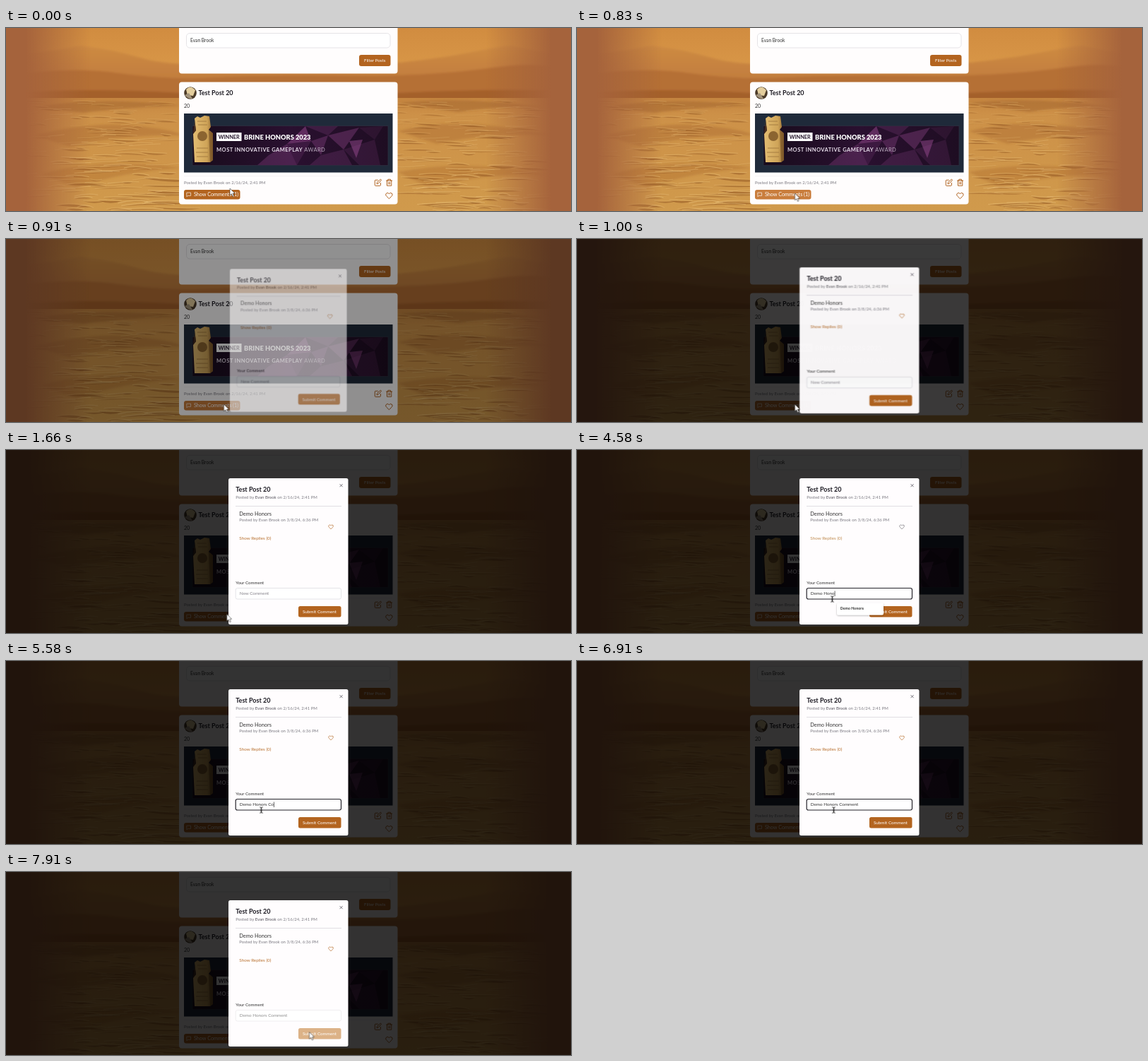
Recreate the animation shown at these times as an HTML page. Size 800x259 px, loop 8 s.

```html
<!DOCTYPE html>
<html lang="en">
<head>
<meta charset="utf-8">
<title>Post comments</title>
<style>
  html, body { margin: 0; width: 100%; height: 100%; overflow: hidden; background: #a5633c; }
  svg { display: block; width: 100%; height: 100%; }
  text { font-family: Lato, "Open Sans", sans-serif; fill: #333; white-space: pre; }
  .bold { font-weight: 700; }
  .heavy { font-weight: 900; }
  .title { font-size: 9px; font-weight: 700; fill: #1c1a22; }
  .meta { font-size: 6px; fill: #7b7a82; }
  .body { font-size: 6.7px; }
  .white { fill: #fff; }
  .mid { text-anchor: middle; }
  .icon { fill: none; stroke: #b0621f; stroke-width: 2.2; stroke-linecap: round; stroke-linejoin: round; }
  .menu text { font: 600 5px Inter, sans-serif; fill: #222; }

  .loop, .loop * { animation-duration: 8s; animation-iteration-count: infinite; animation-timing-function: linear; }
  .show-btn { fill: #b3641f; animation-name: showHover; }
  .shade { animation-name: shade; }
  .modal { transform-origin: 400px 143.5px; animation-name: modal; }
  .field { animation-name: field; }
  .entry { animation-name: entry; }
  .send { animation-name: send; }
  .fav { animation-name: fav; }
  .reply { fill: #b8702f; animation-name: reply; }
  .menu-all { animation-name: menuAll; }
  .menu-one { animation-name: menuOne; }
  .pointer { animation-name: move; }
  .arrow { animation-name: arrow; }
  .beam { animation-name: beam; }

  @keyframes showHover {
    0%, 1.2% { fill: #b3641f; }
    3.2%, 11% { fill: #c97d3c; }
    13.5%, 100% { fill: #b3641f; }
  }
  @keyframes shade {
    0%, 10.6% { opacity: 0; animation-timing-function: ease; }
    13.1%, 100% { opacity: .8; }
  }
  @keyframes modal {
    0%, 10.6% { opacity: 0; transform: scale(.95); animation-timing-function: ease; }
    13.1%, 100% { opacity: 1; transform: none; }
  }
  @keyframes field {
    0%, 27.5% { stroke: #dedde2; stroke-width: .8px; }
    28.1%, 96.8% { stroke: #25232b; stroke-width: 1.2px; }
    97.8%, 100% { stroke: #eceaed; stroke-width: .8px; }
  }
  @keyframes entry {
    0%, 96.8% { opacity: 1; }
    97.8%, 100% { opacity: .55; }
  }
  @keyframes send {
    0%, 90% { fill: #b3641f; }
    92.5%, 96.8% { fill: #c47f42; }
    98.2%, 100% { fill: #dcb287; }
  }
  @keyframes fav {
    0%, 28% { stroke: #b8702f; }
    28.1%, 64.4% { stroke: #77747a; }
    64.5%, 100% { stroke: #b8702f; }
  }
  @keyframes reply {
    0%, 28% { fill: #b8702f; }
    28.1%, 64.4% { fill: #c08b50; }
    64.5%, 100% { fill: #b8702f; }
  }
  @keyframes menuAll {
    0%, 33.2% { visibility: hidden; }
    33.21%, 35.3% { visibility: visible; }
    35.31%, 100% { visibility: hidden; }
  }
  @keyframes menuOne {
    0%, 35.3% { visibility: hidden; }
    35.31%, 64.4% { visibility: visible; }
    64.41%, 100% { visibility: hidden; }
  }
  @keyframes move {
    0% { transform: translate(317px, 227px); animation-timing-function: ease-in-out; }
    10%, 19% { transform: translate(308.5px, 234px); animation-timing-function: ease-in-out; }
    28%, 85.5% { transform: translate(361.5px, 211px); }
    86.4% { transform: translate(363.5px, 211px); animation-timing-function: ease-in-out; }
    93.75%, 100% { transform: translate(429.5px, 226.5px); }
  }
  @keyframes arrow {
    0%, 26.9% { visibility: visible; }
    26.91%, 87.4% { visibility: hidden; }
    87.41%, 100% { visibility: visible; }
  }
  @keyframes beam {
    0%, 26.9% { visibility: hidden; }
    26.91%, 87.4% { visibility: visible; }
    87.41%, 100% { visibility: hidden; }
  }
</style>
</head>
<body>
<svg viewBox="0 0 800 259" preserveAspectRatio="none">
  <defs>
    <linearGradient id="sky" x2="0" y2="1">
      <stop offset="0" stop-color="#d18c40"/><stop offset=".6" stop-color="#d99848"/><stop offset="1" stop-color="#c98540"/>
    </linearGradient>
    <linearGradient id="hills" x2="0" y2="1">
      <stop offset="0" stop-color="#cd8a42"/><stop offset="1" stop-color="#b9733a"/>
    </linearGradient>
    <linearGradient id="sand" x2="0" y2="1">
      <stop offset="0" stop-color="#c48540"/><stop offset=".15" stop-color="#cd9148"/><stop offset="1" stop-color="#d09a4c"/>
    </linearGradient>
    <linearGradient id="sides">
      <stop offset="0" stop-color="#a5633c"/><stop offset=".035" stop-color="#a5633c"/>
      <stop offset=".15" stop-color="#a5633c" stop-opacity="0"/><stop offset=".85" stop-color="#a5633c" stop-opacity="0"/>
      <stop offset=".965" stop-color="#a5633c"/>
    </linearGradient>
    <linearGradient id="panel">
      <stop offset="0" stop-color="#180c1c"/><stop offset=".5" stop-color="#2a1030"/><stop offset="1" stop-color="#1e0d22"/>
    </linearGradient>
    <linearGradient id="gold">
      <stop offset="0" stop-color="#e3bd72"/><stop offset=".7" stop-color="#cfa458"/><stop offset="1" stop-color="#8f6630"/>
    </linearGradient>
    <filter id="soft" x="-20%" y="-50%" width="140%" height="200%"><feGaussianBlur stdDeviation="1.6"/></filter>
    <filter id="fine"><feGaussianBlur stdDeviation=".5"/></filter>
    <filter id="drop" x="-20%" y="-20%" width="140%" height="150%"><feDropShadow dx="0" dy="1" stdDeviation="1.3" flood-opacity=".3"/></filter>
    <path id="heart" d="M20.8 4.6a5.5 5.5 0 0 0-7.8 0L12 5.7l-1-1.1a5.5 5.5 0 0 0-7.8 7.8l1 1.1 7.8 7.7 7.8-7.7 1-1.1a5.5 5.5 0 0 0 0-7.8z"/>
  </defs>

  <!-- desert -->
  <rect width="800" height="105" fill="url(#sky)"/>
  <g filter="url(#soft)">
    <path d="M0 40Q60 34 105 25Q150 30 190 42T300 50T520 52Q600 46 660 34T720 26Q760 34 800 40V110H0z" fill="url(#hills)"/>
    <path d="M0 68Q90 54 160 64T300 70T520 68Q620 66 690 56T800 62V110H0z" fill="#b56f36"/>
    <path d="M0 92Q120 84 250 92T550 92T800 90V110H0z" fill="#a4602c"/>
  </g>
  <rect y="99" width="800" height="160" fill="url(#sand)"/>
  <g filter="url(#soft)">
    <path d="M40 112Q130 96 250 110Q170 112 110 120z M555 106Q640 96 760 112Q690 110 640 119z" fill="#a5682e" opacity=".55"/>
    <path d="M40 152Q120 132 180 138T250 152Q170 150 90 168z M555 146Q620 128 700 140T780 152Q680 148 610 164z" fill="#a9692d" opacity=".4"/>
    <path d="M50 207Q130 182 250 198Q160 204 100 226z M555 204Q650 184 770 208Q680 204 600 226z" fill="#a9692d" opacity=".35"/>
  </g>
  <g id="ripples" filter="url(#fine)"></g>
  <rect width="800" height="259" fill="url(#sides)"/>

  <g class="loop">
    <!-- filter card -->
    <rect x="245" y="-10" width="309.5" height="74.5" rx="4" fill="#fffdfd"/>
    <rect x="255.5" y="7.5" width="288.5" height="20.5" rx="4.5" fill="#fff" stroke="#e3e0e4" stroke-width=".9"/>
    <text class="body" x="261" y="19.7">Evan Brook</text>
    <rect x="500" y="38" width="44.5" height="16" rx="3" fill="#b3641f"/>
    <text class="white mid" x="522.2" y="48.2" font-size="6.2">Filter Posts</text>

    <!-- post card -->
    <rect x="245" y="76.5" width="309.5" height="173" rx="4" fill="#fffdfd"/>
    <circle cx="261" cy="92" r="8.8" fill="#4b3a28"/>
    <path d="M255 87Q261 80 268 88L265 96L257 95z" fill="#e3cd9c"/>
    <path d="M253 95Q258 101 264 100L259 92z" fill="#a3947c"/>
    <text class="title" x="272.5" y="94.9">Test Post 20</text>
    <text x="252" y="113.2" font-size="7.1">20</text>

    <rect x="252" y="121" width="295.5" height="83.5" fill="#1f2a3a"/>
    <rect x="264" y="138.5" width="277" height="56" fill="url(#panel)" stroke="#2f3142" stroke-width=".7"/>
    <g fill="#a24f9a">
      <path d="M398 164L424 139L432 160z" opacity=".45"/><path d="M432 160L456 152L446 180z" opacity=".3"/>
      <path d="M424 139L456 152L470 139z" opacity=".2"/><path d="M456 152L500 141L478 172z" opacity=".32"/>
      <path d="M478 172L522 158L530 194H500z" opacity=".14"/><path d="M486 160L505 158L496 184z" opacity=".45"/>
      <path d="M372 180L398 164L412 194H356z" opacity=".28"/><path d="M446 180L478 172L490 194H430z" opacity=".2"/>
      <path d="M500 141L534 139L522 158z" opacity=".1"/><path d="M398 164L432 160L412 194z" opacity=".16"/>
    </g>
    <path d="M267 128L271 125L275 127L281 124L288 125L290 140L287 144L293 149V187L289 190H267L265 150L269 145z" fill="url(#gold)"/>
    <path d="M287 144L293 149V187L289 190z M267 130L269 145L265 150z" fill="#6d4a22" opacity=".55"/>
    <path d="M270 170H286M269 176H286M270 182H286M271 132H284M272 137H285" stroke="#a57c40" stroke-width="1"/>
    <circle cx="278" cy="153" r="7" fill="#8b6430"/>
    <rect x="298" y="148" width="35.5" height="12" fill="#fff"/>
    <text class="bold mid" x="315.7" y="156.9" font-size="7.3" style="fill:#24152b">WINNER</text>
    <text class="heavy white" x="337" y="157.6" font-size="9.3">BRINE HONORS 2023</text>
    <text class="bold" x="298" y="175.2" font-size="7.55" letter-spacing=".45" style="fill:#e6dce9">MOST INNOVATIVE GAMEPLAY<tspan font-weight="400" fill="#b9a9bd"> AWARD</tspan></text>

    <path d="M252 209.5H547.5" stroke="#f1eff1" stroke-width=".7"/>
    <text class="meta" x="252" y="220.9">Posted by Evan Brook on 2/16/24, 2:41 PM</text>
    <g class="icon">
      <path transform="translate(521.4 213.4) scale(.45)" d="M11 4H4a2 2 0 0 0-2 2v14a2 2 0 0 0 2 2h14a2 2 0 0 0 2-2v-7M18.5 2.5a2.1 2.1 0 0 1 3 3L12 15l-4 1 1-4z"/>
      <path transform="translate(537.2 213.3) scale(.45)" d="M3 6H21M8 6V2H16V6M5 6V22H19V6M10 11V17M14 11V17"/>
      <use href="#heart" transform="translate(537 232.1) scale(.45)"/>
    </g>
    <rect class="show-btn" x="252" y="229" width="79.5" height="13.5" rx="3"/>
    <path class="icon" style="stroke:#fff" transform="translate(255.3 232.2) scale(.3)" d="M3 3H21V17H8L3 21z"/>
    <text class="white" x="266" y="238.3" font-size="7.2">Show Comments (1)</text>

    <rect class="shade" width="800" height="259"/>

    <!-- dialog -->
    <g class="modal">
      <rect x="315" y="40" width="169.5" height="207" rx="2.5" fill="#fffdfe"/>
      <path d="M472.6 48.2l4 4m0-4l-4 4" stroke="#66636b" stroke-width=".9"/>
      <text class="title" x="325.3" y="59.4">Test Post 20</text>
      <text class="meta" x="325.3" y="69">Posted by <tspan fill="#55535c">Evan Brook</tspan> on 2/16/24, 2:41 PM</text>
      <path d="M325 79.5H475" stroke="#dddbe0" stroke-width=".9"/>
      <text x="330.3" y="92.6" font-size="7.4">Demo Honors</text>
      <text class="meta" x="330.3" y="101.4">Posted by Evan Brook on 3/8/24, 6:36 PM</text>
      <use href="#heart" class="icon fav" transform="translate(456.2 105.1) scale(.32)"/>
      <text class="reply" x="330.3" y="126.6" font-size="6.3">Show Replies (0)</text>
      <text x="325.3" y="189.5" font-size="6.1">Your Comment</text>
      <rect class="field" x="325.2" y="195.5" width="149.3" height="15.5" rx="2.5" fill="#fff"/>
      <text class="entry" id="entry" x="330.8" y="205.3" font-size="6.3"></text>
      <path id="caret" d="M0 199.5V207" stroke="#222" stroke-width=".7"/>
      <rect class="send" x="414" y="221" width="60.5" height="15.6" rx="2.5"/>
      <text class="white mid" x="444" y="231" font-size="6.3">Submit Comment</text>
    </g>

    <!-- suggestions -->
    <g class="menu">
      <g class="menu-all">
        <rect x="368" y="216.5" width="66" height="60" rx="2" fill="#fff" filter="url(#drop)"/>
        <text x="378.5" y="226.4">16</text><text x="378.5" y="241.6">19</text><text x="373" y="256.8">Test Reply 1</text>
      </g>
      <g class="menu-one">
        <rect x="368" y="216.5" width="66" height="17" rx="2" fill="#fff" filter="url(#drop)"/>
        <text x="373" y="226.4">Demo Honors</text>
      </g>
    </g>

    <g class="pointer">
      <path class="arrow" d="M0 0V9.8L2.3 7.7L3.9 11.4L5.6 10.7L4 7.1H7z" fill="#fff" stroke="#333" stroke-width=".6"/>
      <path class="beam" d="M-2.2-4.2Q0-4.2 0-3V3Q0 4.2-2.2 4.2M2.2-4.2Q0-4.2 0-3V3Q0 4.2 2.2 4.2M-1 1.2H1" fill="none" stroke="#222" stroke-width=".9"/>
    </g>
  </g>
</svg>
<script>
  const LOOP = 8000;
  const words = "Demo Honors Comment";
  // time of each key press, in ms
  const keys = [2830, 3080, 3250, 3500, 3660, 3910, 4160, 4330, 4570, 4750, 4920,
                5160, 5400, 5580, 5750, 5755, 6160, 6250, 6330];
  const entry = document.getElementById("entry");
  const caret = document.getElementById("caret");

  let seed = 7;
  const rand = () => (seed = seed * 16807 % 2147483647) / 2147483647;

  // crescent shadows with a lit crest above, larger towards the viewer
  function ripples() {
    let out = "";
    for (let i = 0; i < 260; i++) {
      const depth = i / 260;
      const y = 103 + depth * 158;
      const x = (i % 2 ? 540 : 20) + rand() * 200;
      const w = 14 + rand() * (25 + 40 * depth);
      const rise = (rand() - .3) * (2 + 8 * depth);
      const thick = 1.5 + depth * 4 * rand();
      const drop = (rand() - .5) * 5;
      const crest = `M${x} ${y}q${w / 2} ${-rise} ${w} ${drop}`;
      out += `<path d="${crest}q${-w / 2} ${thick - rise} ${-w} ${-drop}" fill="#8f5522" opacity="${.25 + rand() * .3}"/>
        <path d="${crest}" transform="translate(0 -1)" fill="none" stroke="#ebc27c" stroke-width="${.6 + depth * .7}" opacity="${.2 + rand() * .3}"/>`;
    }
    document.getElementById("ripples").innerHTML = out;
  }

  function type() {
    const t = performance.now() % LOOP;
    const count = keys.filter(k => t >= k).length;
    const text = count ? words.slice(0, count) : "New Comment";
    if (entry.textContent !== text) {
      entry.textContent = text;
      entry.style.fill = count ? "#333" : "#85828a";
      const end = 331.3 + (count ? entry.getComputedTextLength() : 0);
      caret.setAttribute("transform", `translate(${end} 0)`);
    }
    caret.style.visibility = count && t < 6900 ? "visible" : "hidden";
    requestAnimationFrame(type);
  }

  ripples();
  type();
</script>
</body>
</html>
```
